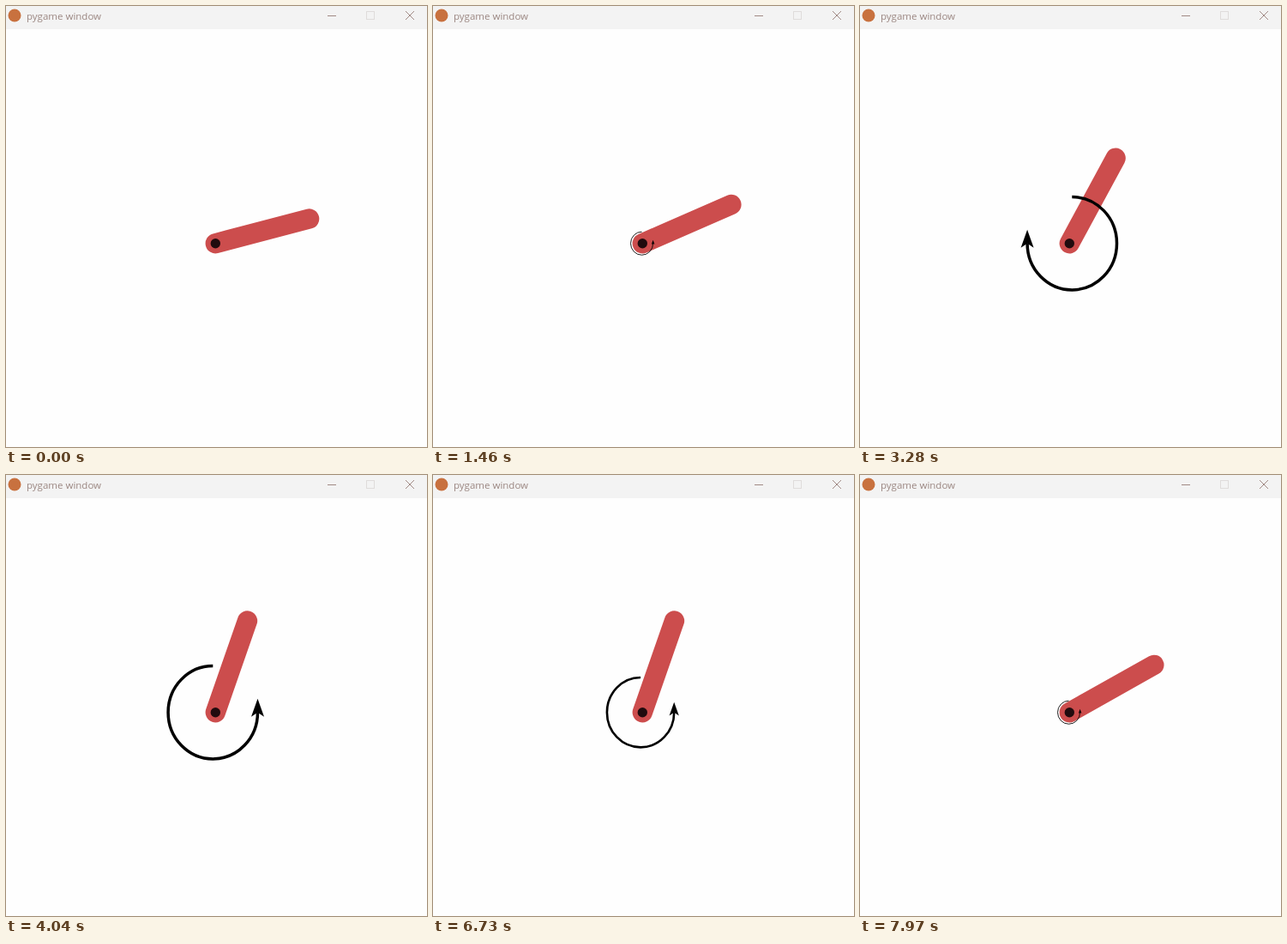
An HTML page for the animation above (8 s loop, 491 by 514 pixels).

```html
<!DOCTYPE html>
<html lang="en">
<head>
<meta charset="utf-8">
<title>Pendulum</title>
<style>
html, body { margin: 0; width: 100%; height: 100%; overflow: hidden; background: #fff; }
svg { display: block; width: 491px; height: 514px; }
text { font: 11.5px "Open Sans", "Noto Sans", sans-serif; fill: #9b8782; }
</style>
</head>
<body>
<svg viewBox="0 0 491 514">
  <rect width="491" height="514" fill="#fefefe"/>
  <rect width="491" height="27" fill="#f3f3f3"/>
  <circle cx="10" cy="11" r="7.5" fill="#c8713f"/>
  <text x="24" y="16">pygame window</text>
  <g fill="none" stroke="#a08984">
    <path d="M375 11.5h10M466 6l10 10M476 6l-10 10"/>
    <rect x="420.5" y="6.5" width="9" height="9" stroke="#dfdcdb"/>
  </g>
  <g transform="translate(244.3 276.7)">
    <line id="rod" y2="113" stroke="#cc4d4d" stroke-width="23.4" stroke-linecap="round"/>
    <g id="torque">
      <path d="M3-54.2A52.2 54.2 0 1 1-49.2 0" fill="none" stroke="#000" stroke-width="3.5"/>
      <path d="M-49.2-16L-41.7 5L-49.2 0L-56.7 5Z"/>
    </g>
    <circle r="5.7" fill="#210b0e"/>
  </g>
</svg>
<script>
const LOOP = 8000, STEP = 70, OFFSET = 60;
const BALANCE = 48, RESET = 98; // steps
const rod = document.getElementById('rod');
const torque = document.getElementById('torque');

// Turning points and passes through the bottom:
// [ms, degrees from hanging, right is positive]
const firstRun = [
  [0, 104.7], [408, 0], [780, -112], [1185, 0], [1600, 130.7],
  [2097, 0], [2530, -126], [2880, 0], [3405, 160.8]
];
const secondRun = [[6920, -154], [7090, -160], [7762, 0], [8102, 150]];

// The rod rests at turning points; its speed at the bottom follows from energy.
function speed(run, i) {
  if (run[i][1] !== 0) return 0;
  const span = run[i + 1][1] - run[i - 1][1];
  return .64 * Math.sin(span / 4 * Math.PI / 180);
}

function angleAt(run, t) {
  const end = run.length - 1;
  if (t >= run[end][0]) return run[end][1];
  const i = run.findIndex(key => key[0] > t) - 1;
  const [t0, a] = run[i], [t1, b] = run[i + 1];
  const d = t1 - t0, s = (t - t0) / d, r = 1 - s;
  return r * r * (1 + 2 * s) * a + s * s * (3 - 2 * s) * b
    + d * s * r * (r * speed(run, i) - s * speed(run, i + 1));
}

function torqueAt(step, run, t, angle) {
  if (step < 0 || step === RESET) return 0;
  if (step >= BALANCE && step < RESET) {
    const beat = (step - BALANCE) % 25;
    return beat < 22 && beat % 2 === 0 ? 2 : 1.5;
  }
  if (angle > 135) return -2;
  return angleAt(run, t + 1) > angle ? .5 : 0;
}

function draw(time) {
  const step = Math.floor((time - OFFSET) / STEP);
  const t = Math.max(0, step * STEP + OFFSET);
  const run = step < RESET ? firstRun : secondRun;
  const angle = angleAt(run, t);
  const u = torqueAt(step, run, t, angle);
  rod.setAttribute('transform', `rotate(${-angle})`);
  torque.setAttribute('visibility', u ? 'visible' : 'hidden');
  torque.setAttribute('transform', `scale(${-u / 2} ${Math.abs(u) / 2})`);
}

const start = performance.now();
function tick() {
  draw((performance.now() - start) % LOOP);
  requestAnimationFrame(tick);
}
tick();
</script>
</body>
</html>
```
